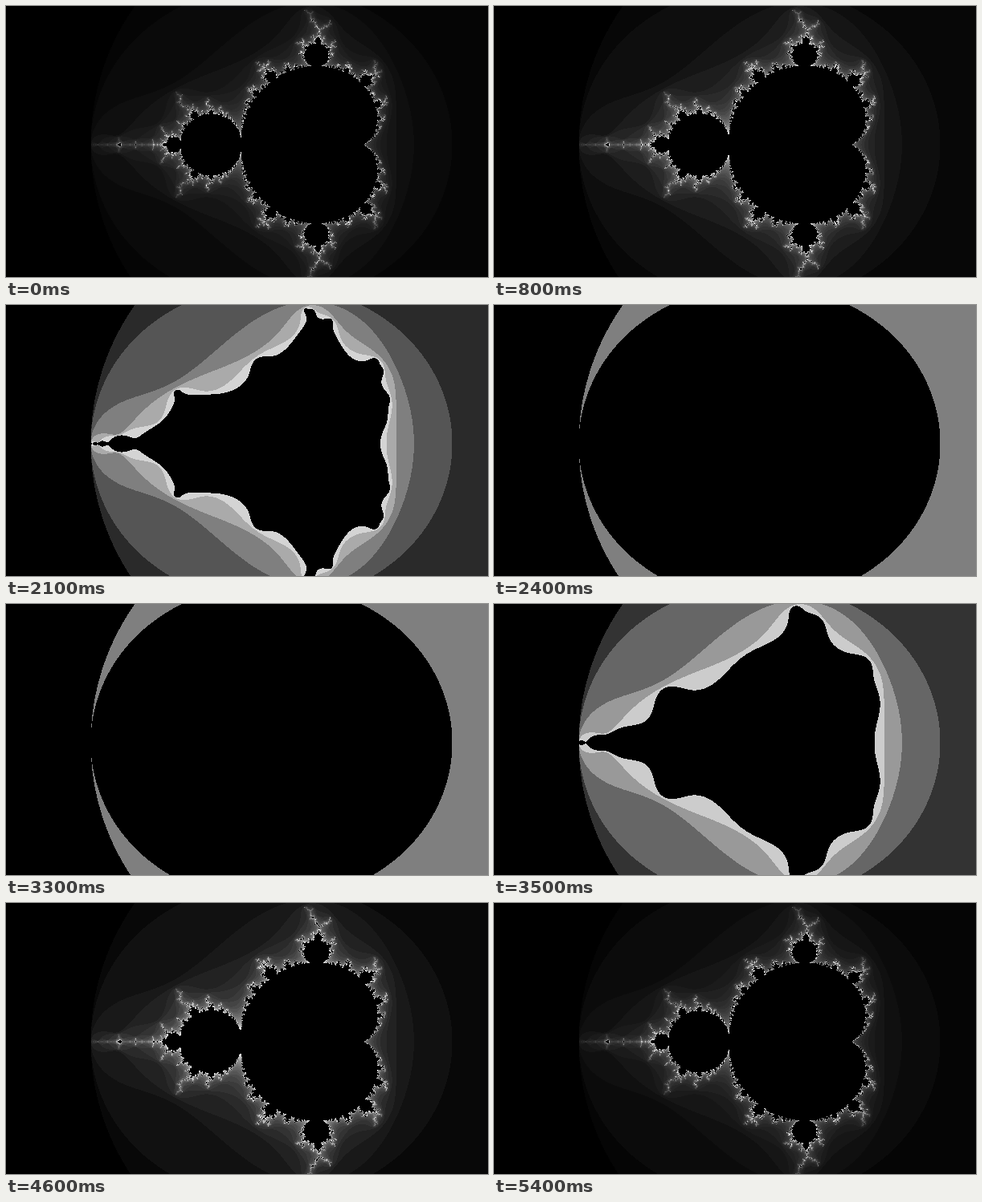
An HTML page with a canvas that plays this animation: 600 px wide and 338 px high, repeating every 5.5 s.

```html
<!DOCTYPE html>
<html lang="en">
<head>
<meta charset="utf-8">
<title>Escape-time fractal</title>
<style>
  html, body { margin: 0; width: 100%; height: 100%; overflow: hidden; background: #000; }
  canvas { display: block; }
</style>
</head>
<body>
<canvas id="stage" width="600" height="338"></canvas>
<script>
const W = 600, H = 338;
const SCALE = 150, ORIGIN_X = 405, ORIGIN_Y = 172.5;
const STEP = 100, STEPS = 55;
const MAX_ITER = 50;

const ctx = document.getElementById('stage').getContext('2d');
const image = ctx.createImageData(W, H);
const pixels = new Uint32Array(image.data.buffer);

function escapeTime(cx, cy) {
  let x = 0, y = 0;
  for (let n = 0; n < MAX_ITER; n++) {
    const nx = x * x - y * y + cx;
    y = 2 * x * y + cy;
    x = nx;
    if (x * x + y * y > 4) return n;
  }
  return MAX_ITER;
}

const times = new Uint8Array(W * H);
for (let py = 0; py < H; py++) {
  for (let px = 0; px < W; px++) {
    times[py * W + px] = escapeTime((px - ORIGIN_X) / SCALE, (py - ORIGIN_Y) / SCALE);
  }
}

// The iteration limit swings along a sine between 0 and MAX_ITER.
const limitAt = step => Math.floor(MAX_ITER / 2 * (1 + Math.sin(0.1 * (step + 19))));

const shades = new Uint32Array(MAX_ITER + 1);
function draw(limit) {
  for (let n = 0; n <= MAX_ITER; n++) {
    const v = n < limit ? Math.floor(255 * n / limit) : 0;
    shades[n] = (255 << 24 | v << 16 | v << 8 | v) >>> 0;
  }
  for (let i = 0; i < pixels.length; i++) pixels[i] = shades[times[i]];
  ctx.putImageData(image, 0, 0);
}

const start = performance.now();
let shown = -1;
function tick() {
  const step = Math.floor((performance.now() - start) / STEP) % STEPS;
  const limit = limitAt(step);
  if (limit !== shown) draw(shown = limit);
  requestAnimationFrame(tick);
}
tick();
</script>
</body>
</html>
```
